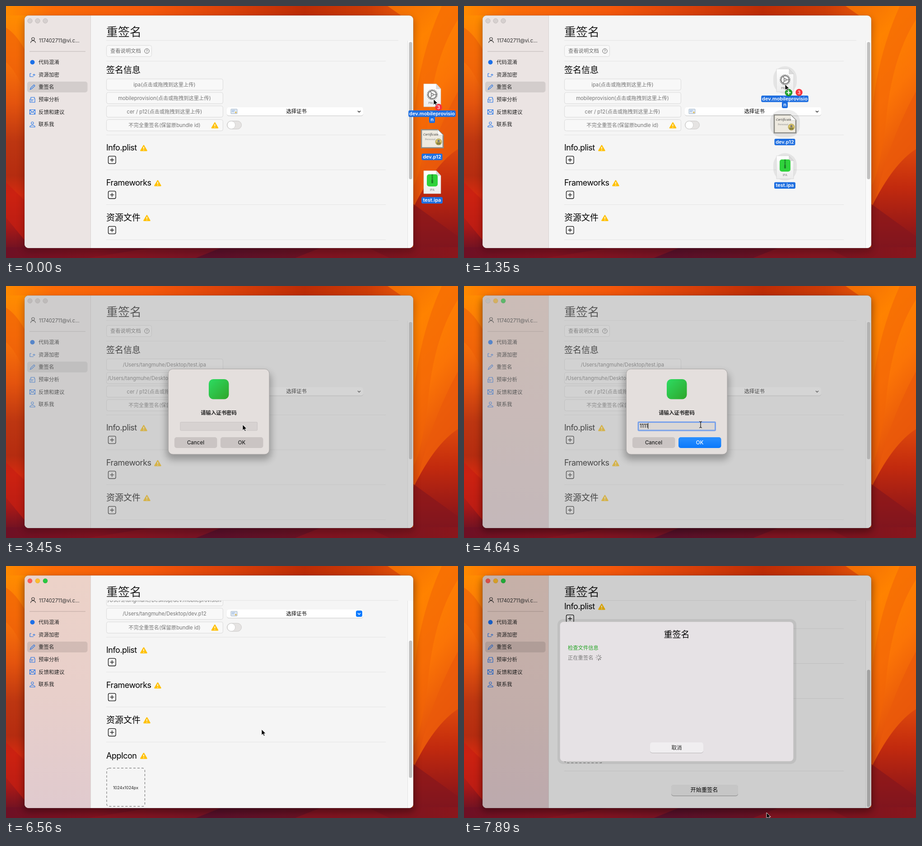
Write an HTML page that moves like this. It is 1001 by 560 pixels and loops after 8 s.

```html
<!DOCTYPE html>
<html lang="zh">
<head>
<meta charset="utf-8">
<style>
html, body { margin: 0; width: 100%; height: 100%; overflow: hidden; }
svg { display: block; width: 1001px; height: 560px; }
text { font-family: Inter, "Noto Sans CJK SC", "Noto Sans CJK", sans-serif; white-space: pre; }
.side { fill: #ebe4e3; }
.active .side { fill: url(#pink); }
.alerting:not(.active) .side { fill: #f1efef; }
.select { fill: #000; opacity: .1; }
.active.alerting .select { opacity: 0; }
.light { fill: #d6d0cf; stroke: #bdb7b6; stroke-width: .8; }
.active .light { fill: var(--on); stroke: #0002; }
.active.alerting .light.close { fill: #d6d0cf; }
.field { fill: #f8f8f8; stroke: #dadada; }
.chosen { opacity: 0; }
.active:not(.alerting) .chosen { opacity: 1; }
.blue { fill: none; stroke: #1c70e8; stroke-width: 1.1; }
.line { stroke: #e4e4e4; }
.plus { fill: none; stroke: #111; stroke-width: 1.3; }
.entry { fill: #d7d2d1; stroke: #c8c3c2; }
.active .entry { fill: #dad7d5; stroke: #7aa2ea; stroke-width: 3; }
.ok { fill: #cac4c3; }
.active .ok { fill: url(#okBlue); }
.okText { fill: #222; }
.active .okText { fill: #fff; }
</style>
</head>
<body>
<script>
const LOOP = 8000;
const HOME = '/Users/tangmuhe/Desktop/';
const HINT = '(点击或拖拽到这里上传)';

const attrs = o => Object.entries(o).map(([k, v]) => `${k}="${v}"`).join(' ');
const rect = (x, y, w, h, r, o = {}) =>
  `<rect x="${x}" y="${y}" width="${w}" height="${h}" rx="${r}" ${attrs(o)}/>`;
const circle = (x, y, r, o = {}) => `<circle cx="${x}" cy="${y}" r="${r}" ${attrs(o)}/>`;
const path = (d, o = {}) => `<path d="${d}" ${attrs(o)}/>`;
const text = (x, cy, size, str, o = {}) =>
  `<text x="${x}" y="${cy + size * .36}" font-size="${size}" ${attrs(o)}>${str}</text>`;
const mid = (x, cy, size, str, o = {}) => text(x, cy, size, str, { 'text-anchor': 'middle', ...o });
const group = (id, body, o = {}) => `<g id="${id}" ${attrs(o)}>${body}</g>`;
const gradient = (id, dir, ...stops) => {
  const [x1, y1, x2, y2] = dir;
  return `<linearGradient id="${id}" x1="${x1}" y1="${y1}" x2="${x2}" y2="${y2}">` +
    stops.map(s => s.split(' ')).map(([c, p]) => `<stop offset="${p}" stop-color="${c}"/>`).join('') +
    '</linearGradient>';
};
const DOWN = [0, 0, 0, 1], ACROSS = [0, 0, 1, 0];

const defs = `<defs>
  ${gradient('top', ACROSS, '#ff8a00 0', '#fb6c08 .1', '#f4580b .32', '#dc430a .48', '#bd2c06 .66', '#cc3c07 .8', '#e05008 .87')}
  ${gradient('left', DOWN, '#ff8c00 0', '#fb7608 .16', '#e4540e .36', '#bd3611 .52', '#b52c10 .66', '#d62a10 .74', '#a31818 .88', '#5a1028 1')}
  ${gradient('right', [0, 0, .4, 1], '#f06c06 0', '#ff8200 .3', '#fb7406 .6', '#e04c0c 1')}
  ${gradient('ember', DOWN, '#dd480c 0', '#c22a0e .35', '#9a1a16 .7', '#6a1224 1')}
  ${gradient('floor', ACROSS, '#6e1024 0', '#7e1220 .2', '#58102a .45', '#6c1222 .7', '#8a161c 1')}
  ${gradient('pink', DOWN, '#ecd2c8 0', '#e8cfca .5', '#e0cace 1')}
  ${gradient('okBlue', DOWN, '#2b90ff 0', '#0a78fb 1')}
  ${gradient('leaf', [0, 0, 1, 1], '#2ddc62 0', '#2fa52a 1')}
  ${gradient('paper', DOWN, '#ffffff 0', '#ececec 1')}
  <clipPath id="frame">${rect(41, 21, 861, 517, 9)}</clipPath>
  <clipPath id="view">${rect(188, 77, 701, 461, 0)}</clipPath>
  <filter id="soft" x="-30%" y="-30%" width="160%" height="160%"><feGaussianBlur stdDeviation="8"/></filter>
</defs>`;

const wallpaper =
  rect(0, 0, 1001, 560, 0, { fill: 'url(#top)' }) +
  rect(0, 21, 60, 539, 0, { fill: 'url(#left)' }) +
  path('M0 48Q22 62 41 96V190Q20 140 0 125Z', { fill: '#ef6008', opacity: .6 }) +
  path('M0 392L41 432V520L0 470Z', { fill: '#c81f12', opacity: .7 }) +
  path('M845 0H1001V330L902 450V40Z', { fill: 'url(#right)' }) +
  path('M1001 30Q950 110 936 240T902 400V250Q915 110 965 0H1001Z', { fill: '#f36406', opacity: .55 }) +
  path('M1001 190Q940 300 908 445L1001 350Z', { fill: '#ec5a0a', opacity: .7 }) +
  path('M902 448Q950 350 1001 318V560H902Z', { fill: 'url(#ember)' }) +
  path('M902 440L1001 512V560H902Z', { fill: '#85161e', opacity: .65 }) +
  rect(0, 536, 1001, 24, 0, { fill: 'url(#floor)' }) +
  path('M180 560L330 536H480L420 560ZM640 560L700 536H800L850 560Z', { fill: '#8c1620', opacity: .6 });

const warning = (x, y) =>
  path(`M${x} ${y - 6}L${x + 6.6} ${y + 5.3}H${x - 6.6}Z`,
    { fill: '#ffc107', stroke: '#ffc107', 'stroke-width': 2.4, 'stroke-linejoin': 'round' }) +
  path(`M${x} ${y - 3}v4.4M${x} ${y + 3.2}v1.6`, { stroke: '#fff', 'stroke-width': 1.7 });
const plusBox = y =>
  rect(226.5, y - 8.3, 16.6, 16.6, 3, { class: 'plus' }) +
  path(`M230.3 ${y}h9M234.8 ${y - 4.5}v9`, { class: 'plus' });
const rule = (y, end = 841) => path(`M222 ${y}H${end}`, { class: 'line' });
const field = (y, str, id) =>
  rect(222.5, y - 12, 258, 25, 4, { fill: '#0001' }) +
  rect(222.5, y - 12.5, 258, 25, 4, { class: 'field' }) +
  mid(351, y, 11.3, str, { fill: '#747474', id });
const latin = { 'letter-spacing': -.5 };
const section = (y, str, width, o) => text(222, y, o ? 18 : 19, str, o) + warning(222 + width, y + 1);

const certIcon = rect(498, 229, 14, 10.5, 1, { fill: '#dfe8f2', stroke: '#91a6bd', 'stroke-width': .8 }) +
  path('M500 232h7M500 234.5h5', { stroke: '#6f9cd6', 'stroke-width': .8 }) +
  circle(509, 236.5, 1.7, { fill: '#e2b84a' });

const content =
  rect(222.5, 87.5, 100, 25, 4, { class: 'field' }) +
  text(231, 100, 11.3, '查看说明文档', { fill: '#6c6c6c' }) +
  circle(312, 100, 5.2, { fill: 'none', stroke: '#666' }) + mid(312, 100, 8, '?', { fill: '#555' }) +
  rule(122.5) + text(222, 142, 19, '签名信息') +
  field(174.5, 'ipa' + HINT, 'ipa') + field(204.5, 'mobileprovision' + HINT, 'profile') +
  field(234.5, 'cer / p12' + HINT, 'cert') + field(265, '不完全重签名(保留原bundle id)', 'keep') +
  warning(462.5, 265.5) +
  rect(489, 226, 302, 18.5, 4.5, { fill: '#0003' }) + rect(489, 225, 302, 18.5, 4.5, { fill: '#fff' }) +
  certIcon + mid(643, 234, 11.3, '选择证书') +
  path('M779 233l3 3 3-3', { fill: 'none', stroke: '#222', 'stroke-width': 1.4 }) +
  group('chosen', rect(775, 227.3, 14, 14, 3.5, { fill: '#0a7aff' }) +
    path('M779 233l3 3 3-3', { fill: 'none', stroke: '#fff', 'stroke-width': 1.6 }), { class: 'chosen' }) +
  rect(489.5, 255.5, 32, 18, 9, { fill: '#e5e3e2', stroke: '#cbc9c8' }) +
  circle(499, 264.5, 8.8, { fill: '#fff', stroke: '#c8c8c8', 'stroke-width': .8 }) +
  rule(286.5) + section(315, 'Info.plist', 83, latin) + plusBox(342) +
  rule(364) + section(393, 'Frameworks', 114, latin) + plusBox(419.7) +
  rule(441.5) + section(470.5, '资源文件', 90) + plusBox(498) +
  rule(519.5) + section(549.5, 'AppIcon', 83, latin) +
  rect(223, 577.5, 84.5, 85, 5, { fill: 'none', stroke: '#777', 'stroke-width': 1.2, 'stroke-dasharray': '5 4' }) +
  mid(265, 621, 9, '1024x1024px', { fill: '#222' }) +
  rule(680.5) + rect(459, 712, 148, 24.5, 5, { fill: '#0004' }) +
  rect(459, 711, 148, 24, 5, { fill: '#ececec' }) + mid(532, 722.3, 12.2, '开始重签名');

const menuIcons = [
  circle(58.5, 125, 5, { fill: '#1c70e8' }),
  path('M53 150v7h8M53 150h3M59 153h6M62 150.5v5', { class: 'blue' }),
  path('M53.5 185.500l1.500-4 7-6.500 2 2.500-7 6.500z', { class: 'blue' }),
  path('M55 203h8v3h1v8H53v-7h2zM55 208.500h6M55 211h4', { class: 'blue' }),
  path('M52.500 230.500h12v10h-12zl6 6 6-6M52.500 240.500l4-5M64.500 240.500l-4-5', { class: 'blue' }),
  path('M58.500 257.500a2.600 2.600 0 1 1-.1 0M53 269v-2l4-2h3l4 2v2z', { class: 'blue' }),
];
const sidebar =
  rect(41, 21, 146.5, 517, 0, { class: 'side' }) + path('M187.500 21V538', { stroke: '#d8d3d2' }) +
  ['#ff5f57', '#febc2e', '#28c840'].map((c, i) =>
    circle(53 + 17 * i, 33, 5.2, { class: i ? 'light' : 'light close', style: `--on:${c}` })).join('') +
  path('M60 70a3.200 3.200 0 1 1-.1 0M54.500 82q1-5 5.500-5t5.500 5', { fill: 'none', stroke: '#222', 'stroke-width': 1.1 }) +
  text(73, 77, 11.3, '117402711@vi.c...', { fill: '#333', 'letter-spacing': -.1 }) +
  path('M52 101H176', { stroke: '#000', opacity: .2 }) +
  rect(47, 168, 133.500, 24, 5, { class: 'select' }) +
  ['代码混淆', '资源加密', '重签名', '预审分析', '反馈和建议', '联系我'].map((s, i) =>
    menuIcons[i] + text(72, 125 + 27.6 * i, 11.5, s, { fill: '#222' })).join('');

const win =
  rect(38, 26, 867, 520, 12, { fill: '#000', filter: 'url(#soft)', id: 'shadow' }) +
  `<g clip-path="url(#frame)">` +
  rect(41, 21, 861, 517, 0, { fill: '#f5f5f5' }) + sidebar +
  text(222, 58, 26, '重签名', { fill: '#222' }) + rule(76.5, 869) +
  `<g clip-path="url(#view)">${group('scroll', content)}</g>` +
  rect(889.5, 77, 13, 461, 0, { fill: '#fafafa' }) + path('M889.500 77V538', { class: 'line' }) +
  rect(892.5, 80, 7, 305, 3.5, { fill: '#c1c1c1', id: 'thumb' }) +
  rect(41, 21, 861, 517, 0, { fill: '#9f9f9f', id: 'veil' }) +
  rect(41, 21, 861, 517, 0, { fill: '#000', id: 'shade' }) + '</g>' +
  rect(41, 21, 861, 517, 9, { fill: 'none', stroke: '#0002' });

const alertBox = group('alert',
  rect(355, 192, 232, 194, 14, { fill: '#000', opacity: .28, filter: 'url(#soft)' }) +
  rect(359.5, 184.5, 223.5, 189.5, 10, { fill: '#e4dfdd', stroke: '#a9a6a5' }) +
  rect(449, 207, 44.5, 44.5, 10, { fill: 'url(#leaf)' }) +
  mid(471, 281.5, 11.4, '请输入证书密码', { 'font-weight': 700, fill: '#222' }) +
  rect(386, 302.5, 170.5, 18.5, 1.5, { class: 'entry' }) +
  text(389, 311, 11.3, '', { id: 'typed' }) +
  path('M0 304.500v13', { stroke: '#111', id: 'caret' }) +
  rect(373, 336, 94.5, 24, 5, { fill: '#cac4c3' }) + mid(420, 348, 11.5, 'Cancel', { fill: '#222', 'font-weight': 500 }) +
  rect(475, 336, 94.5, 24, 5, { class: 'ok' }) + mid(522, 348, 11.5, 'OK', { class: 'okText', 'font-weight': 500 }));

const spokes = Array.from({ length: 8 }, (_, i) =>
  path('M0-3V-6.300', { stroke: '#555', 'stroke-width': 1.5, 'stroke-linecap': 'round',
    opacity: .25 + i * .09, transform: `rotate(${i * 45})` })).join('');
const sheet = group('sheet',
  rect(207, 118, 529, 322, 13, { fill: '#000', opacity: .07 }) +
  rect(212.5, 124, 517, 310, 8, { fill: '#e6e2e5', stroke: '#c9c6c8', 'stroke-width': .6 }) +
  mid(471, 152.5, 19, '重签名') +
  text(230, 182, 11.3, '检查文件信息', { fill: '#23a423' }) +
  group('signing', text(230, 203.5, 11.3, '正在重签名', { fill: '#777' }) + group('spinner', spokes)) +
  rect(412, 393, 118, 23, 5, { fill: '#0003' }) + rect(412, 392, 118, 23, 5, { fill: '#f0eef0' }) +
  mid(471, 404, 11.5, '取消', { fill: '#222' }));

const doc = (y, label) =>
  path(`M925 ${y}h28l10 11v40h-38z`, { fill: 'url(#paper)', stroke: '#c9c9c9', 'stroke-width': .6 }) +
  path(`M953 ${y}v11h10z`, { fill: '#dcdcdc', stroke: '#bbb', 'stroke-width': .5 }) +
  mid(944, y + 43, 6.5, label, { fill: '#777' });
const tag = (y, w, str) => rect(943.5 - w / 2, y - 7, w, 14.5, 3, { fill: '#1f6fe0' }) +
  mid(943.5, y, 11, str, { fill: '#fff', 'font-weight': 600 });
const gear = circle(944, 197, 9, { fill: 'none', stroke: '#777', 'stroke-width': 2 }) +
  circle(944, 197, 11, { fill: 'none', stroke: '#777', 'stroke-width': 2, 'stroke-dasharray': '1.7 1.756' }) +
  circle(944, 197, 2.5, { fill: 'none', stroke: '#777', 'stroke-width': 1.3 }) +
  path('M946.500 197h6.500M942.700 194.800l-3.200-5.600M942.700 199.200l-3.200 5.600', { stroke: '#777', 'stroke-width': 1.6 });
const certificate =
  path('M920 275h36l12 12v28h-48z', { fill: '#eeeae0', stroke: '#8b8b86', 'stroke-width': 2.6 }) +
  path('M956 275v12h12z', { fill: '#fff', stroke: '#bbb', 'stroke-width': .6 }) +
  text(924, 285, 9, 'Certificate', { 'font-style': 'italic', fill: '#444', 'font-family': 'serif', style: 'font-family:Noto Serif,serif;font-size:7px' }) +
  text(928, 296, 6, 'Personal', { fill: '#888', style: 'font-family:Noto Serif,serif;font-size:5.5px' }) +
  circle(958, 302, 7, { fill: '#d9c368', stroke: '#a99a4e' }) + circle(958, 300, 2.5, { fill: '#777' }) +
  path('M954 308h8l1-5h-10z', { fill: '#8c8340' });
const zip = rect(932, 374, 24, 27, 5, { fill: '#2fd23c' }) +
  path('M944 374v14', { stroke: '#176b20', 'stroke-width': 3, 'stroke-dasharray': '1.5 1' }) +
  rect(942, 386, 4, 8, 1.5, { fill: '#1c8427' });
const files = group('files',
  group('halos', [198, 295, 391].map((y, i) =>
    rect(i === 1 ? 911 : 918, y - 31, i === 1 ? 66 : 52, 61, 26, { fill: '#000', opacity: .07 })).join('')) +
  doc(173, 'PROV') + gear + tag(239, 104.5, 'dev.mobileprovisio') + tag(252.5, 13, 'n') +
  certificate + tag(335, 46, 'dev.p12') + doc(366, 'IPA') + zip + tag(431.5, 47, 'test.ipa'));

const pointer =
  group('count', circle(0, 0, 7.7, { fill: '#f8323c' }) + mid(0, 0, 10.5, '3', { fill: '#fff', 'font-weight': 500 })) +
  group('copy', circle(8, 18.5, 7.8, { fill: '#20a32a', stroke: '#13751b', 'stroke-width': .8 }) +
    path('M3.500 18.500h9M8 14v9', { stroke: '#fff', 'stroke-width': 2 })) +
  path('M0 0V13l3-2.800 2 4.600 2.200-1-2-4.400h4z', { fill: '#000', stroke: '#fff', 'stroke-width': .9, id: 'arrow' }) +
  path('M-3-7q3 0 3 2.500q0-2.500 3-2.500M0-5V5M-3 7q3 0 3-2.500q0 2.500 3 2.500', { fill: 'none', stroke: '#111', 'stroke-width': 1.2, id: 'beam' });

document.body.innerHTML = `<svg viewBox="0 0 1001 560">${defs}${wallpaper}${win}${alertBox}${sheet}${files}${group('pointer', pointer)}</svg>`;
const svg = document.querySelector('svg');
const el = Object.fromEntries([...svg.querySelectorAll('[id]')].map(n => [n.id, n]));

// Rows of time followed by values, joined by straight lines.
const pointerPath = [
  [0, 947, 207], [150, 937, 198], [450, 937, 198], [750, 890, 189], [1050, 800, 179],
  [1350, 711, 174], [1500, 670, 174], [1800, 618, 175], [2100, 584, 176], [2400, 562, 176],
  [2550, 566, 176], [2700, 566, 176], [3300, 524, 308], [5080, 524, 308], [5830, 566, 363],
  [6860, 566, 363], [7145, 540, 495], [7300, 540, 495], [7870, 670, 548],
];
const scrollPath = [[5980, 0], [6110, 8], [6260, 40], [6410, 85], [6550, 127.5], [6700, 175], [6850, 208], [7000, 225]];

function track(rows, t) {
  const i = rows.findIndex(r => r[0] > t);
  if (i < 0) return rows.at(-1).slice(1);
  if (i === 0) return rows[0].slice(1);
  const [a, b] = [rows[i - 1], rows[i]];
  const k = (t - a[0]) / (b[0] - a[0]);
  return a.slice(1).map((v, j) => v + (b[j + 1] - v) * k);
}
const ramp = (t, a, b) => Math.min(1, Math.max(0, (t - a) / (b - a)));
const snap = t => t < 4045 ? Math.floor(t / 150) * 150 : 4045 + Math.floor((t - 4045) / 147.5) * 147.5;
const show = (node, on) => node.setAttribute('opacity', +on);
const move = (node, x, y, extra = '') => node.setAttribute('transform', `translate(${x} ${y})${extra}`);

function draw(time) {
  const t = snap(time);
  const [x, y] = track(pointerPath, t);
  const [s] = track(scrollPath, t);
  const active = t >= 3750;
  const alert = ramp(t, 2700, 3000) * (1 - ramp(t, 4930, 5220));
  const sheetIn = ramp(t, 7290, 7580);
  const dragging = t < 2550;

  svg.classList.toggle('active', active);
  svg.classList.toggle('alerting', alert > 0);
  show(el.shadow, active ? .36 : .22);
  show(el.veil, .44 * alert);
  show(el.alert, alert);
  show(el.shade, .16 * sheetIn);
  show(el.sheet, sheetIn);
  show(el.signing, t >= 7580);
  move(el.spinner, 298, 203.5, ` rotate(${Math.round(t / 147.5) * 45})`);

  move(el.scroll, 0, -s);
  el.thumb.setAttribute('y', 80 + s * .669);
  el.ipa.textContent = t < 2700 ? 'ipa' + HINT : HOME + 'test.ipa';
  el.profile.textContent = t < 2700 ? 'mobileprovision' + HINT : HOME + 'dev.mobileprovision';
  el.cert.textContent = t < 5070 ? 'cer / p12' + HINT : HOME + 'dev.p12';

  const typed = [4045, 4190, 4340, 4630, 4780].filter(at => t >= at).length;
  el.typed.textContent = '1'.repeat(typed);
  move(el.caret, 389.5 + (typed && el.typed.getComputedTextLength()), 0);
  show(el.caret, active);

  const over = x < 902;
  show(el.files, dragging);
  show(el.halos, t >= 150);
  move(el.files, t < 150 ? 0 : x - 944, t < 150 ? 0 : y - 207);
  show(el.count, dragging);
  move(el.count, over ? 31 : 11, 18);
  show(el.copy, over && t < 2700);
  const beam = active && alert > 0;
  show(el.arrow, !beam);
  show(el.beam, beam);
  move(el.pointer, x, y);
}

const start = performance.now();
function tick() {
  draw((performance.now() - start) % LOOP);
  requestAnimationFrame(tick);
}
tick();
</script>
</body>
</html>
```
